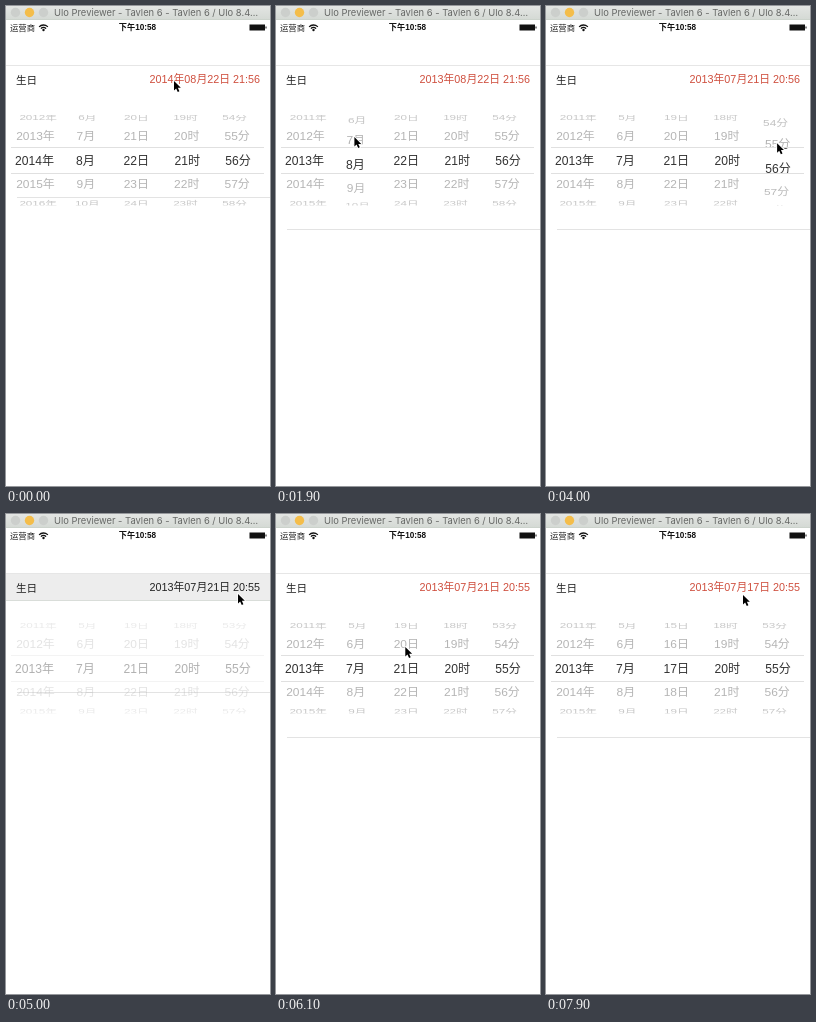
Recreate the animation shown at these times as an HTML page with a canvas. Size 264x480 px, loop 8000 ms.

```html
<!DOCTYPE html>
<html lang="zh-CN">
<head>
<meta charset="utf-8">
<style>
html, body { margin: 0; width: 100%; height: 100%; overflow: hidden; background: #fff; }
canvas { display: block; }
</style>
</head>
<body>
<canvas id="stage" width="264" height="480"></canvas>
<script>
const ctx = document.getElementById('stage').getContext('2d');
const LOOP = 8000, MID = 154.5, RADIUS = 54, STEP = 0.461, PULL = 22.5;
const FONT = '"Liberation Sans", "Noto Sans CJK SC", "Noto Sans CJK", sans-serif';
const UNITS = '年月日时分', START = [2014, 8, 22, 21, 56];
const CLOSE_AT = 4885, REOPEN_AT = 5680;

const columnX = col => 28.5 + 50.9 * col;
const drag = (at, col, y, steps = 1) => ({ at, col, y, steps, x: columnX(col) - 1, time: 300 + 100 * steps });
const rest = (at, x, y) => ({ at, x, y, steps: 0, time: 0 });

const gestures = [
  rest(0, 168, 75), drag(600, 0, 130), drag(1800, 1, 127.5), drag(2300, 2, 132),
  drag(2800, 3, 140), drag(3850, 4, 130), rest(4750, 232, 80),
  drag(6100, 2, 133, 4), rest(7850, 197, 81)
];

// Eased 0 to 1, beginning at start
function ramp(t, start, time) {
  const u = Math.min(1, Math.max(0, (t - start) / time));
  return u * u * (3 - 2 * u);
}

const pulled = (g, t) => g.time ? g.steps * ramp(t, g.at, g.time) : 0;
const tapped = (t, at) => ramp(t, at, 80) - ramp(t, at + 250, 150);

function wheelValue(col, t) {
  return gestures.filter(g => g.col === col).reduce((v, g) => v - pulled(g, t), START[col]);
}

// The date only follows wheels that have come to rest
function settledValue(col, t) {
  return gestures.filter(g => g.col === col && g.at + g.time <= t).reduce((v, g) => v - g.steps, START[col]);
}

function pointerAt(t) {
  let { x, y } = gestures[0], free = 0;
  for (const g of gestures) {
    const leave = Math.max(free, g.at - 450);
    const move = ramp(t, leave, Math.max(1, g.at - leave));
    x += (g.x - x) * move;
    y += (g.y - y) * move + PULL * pulled(g, t);
    free = g.at + g.time;
  }
  return [x, y];
}

function box(x, y, w, h, color) {
  ctx.fillStyle = color;
  ctx.fillRect(x, y, w, h);
}

function text(str, x, y, size, color, align = 'left', weight = 400, family = FONT) {
  ctx.font = `${weight} ${size}px ${family}`;
  ctx.textAlign = align;
  ctx.fillStyle = color;
  ctx.fillText(str, x, y + size * .36);
}

function disc(x, y, r, color) {
  ctx.fillStyle = color;
  ctx.beginPath();
  ctx.arc(x, y, r, 0, 7);
  ctx.fill();
}

function drawBars() {
  const shade = ctx.createLinearGradient(0, 0, 0, 14);
  shade.addColorStop(0, '#e3e5e3');
  shade.addColorStop(1, '#d4d9d4');
  box(0, 0, 264, 14, shade);
  box(0, 13, 264, 1, '#ccd3cc');
  ['#cccfcc', '#f4bd4a', '#cccfcc'].forEach((c, i) => disc(9.5 + 14 * i, 6.5, 4.7, c));
  text('Ulo Previewer - Tavlen 6 - Tavlen 6 / Ulo 8.4…', 48, 7, 9.4, '#666866', 'left', 400, 'Inter, sans-serif');

  text('运营商', 4, 21.5, 8.4, '#222');
  text('下午10:58', 131.5, 21.5, 8.2, '#111', 'center', 700);
  ctx.strokeStyle = '#111';
  ctx.lineWidth = 1.3;
  for (const r of [3.5, 6]) {
    ctx.beginPath();
    ctx.arc(37.5, 25, r, -Math.PI * .76, -Math.PI * .24);
    ctx.stroke();
  }
  disc(37.5, 24, 1.2, '#111');
  box(243.5, 18.5, 15.5, 6, '#111');
  box(259.5, 20.5, 1, 2, '#111');
}

function drawRow(t, open) {
  ctx.globalAlpha = tapped(t, 4780) + tapped(t, 5590);
  box(0, 59, 264, 28, '#ededed');
  box(0, 86, 264, 1, '#d9ddd9');
  ctx.globalAlpha = 1;
  box(0, 59, 264, 1, '#e6e6e6');
  const [y, mo, d, h, mi] = START.map((_, col) => String(settledValue(col, t)).padStart(2, '0'));
  const red = t < CLOSE_AT || t >= REOPEN_AT;
  text('生日', 10, 74.4, 10.6, '#222');
  text(`${y}年${mo}月${d}日 ${h}:${mi}`, 254, 73.5, 10.8, red ? '#cf4f3e' : '#222', 'right');
  box(11, Math.round(87 + 136 * open), 253, 1, '#e3e3e3');
}

function drawWheels(t, color, clips) {
  ctx.save();
  ctx.beginPath();
  clips.forEach(([top, bottom]) => ctx.rect(0, top, 264, bottom - top));
  ctx.clip();
  const base = ctx.globalAlpha;
  [...UNITS].forEach((unit, col) => {
    const value = wheelValue(col, t);
    for (let n = Math.floor(value) - 2; n <= Math.ceil(value) + 2; n++) {
      const angle = (n - value) * STEP, depth = Math.cos(angle);
      const scale = 1 - .09 * (1 - depth);
      ctx.save();
      ctx.globalAlpha = base * (.2 + .8 * depth);
      ctx.translate(132, MID + RADIUS * Math.sin(angle));
      ctx.scale(scale, depth);
      text(n + unit, columnX(col) - 132, 0, 12.1, color, 'center');
      ctx.restore();
    }
  });
  ctx.restore();
}

function drawPicker(t, open) {
  const closing = t >= CLOSE_AT && t < REOPEN_AT;
  ctx.globalAlpha = closing ? open ** 2.4 : Math.min(1, open * 1.32);
  box(5, 141, 253, 1, '#e0e0e0');
  box(5, 167, 253, 1, '#e0e0e0');
  drawWheels(t, '#adadad', [[109, 141], [168, 199.5]]);
  drawWheels(t, '#333', [[142, 167]]);
  ctx.globalAlpha = 1;
}

function drawPointer(t) {
  ctx.save();
  ctx.translate(...pointerAt(t));
  ctx.scale(.9, .9);
  const arrow = new Path2D('M0 0V10.5L2.4 8.3L4.2 12.2L6 11.4L4.3 7.6H7.6Z');
  ctx.strokeStyle = '#fff';
  ctx.lineWidth = 1.6;
  ctx.stroke(arrow);
  ctx.fillStyle = '#000';
  ctx.fill(arrow);
  ctx.restore();
}

function draw(now) {
  const t = now % LOOP;
  const open = ramp(t, -205, 300) - ramp(t, CLOSE_AT, 300) + ramp(t, REOPEN_AT, 300);
  box(0, 0, 264, 480, '#fff');
  drawBars();
  drawRow(t, open);
  if (open > 0) drawPicker(t, open);
  drawPointer(t);
}

const start = performance.now();
function tick() {
  draw(performance.now() - start);
  requestAnimationFrame(tick);
}
tick();
</script>
</body>
</html>
```
